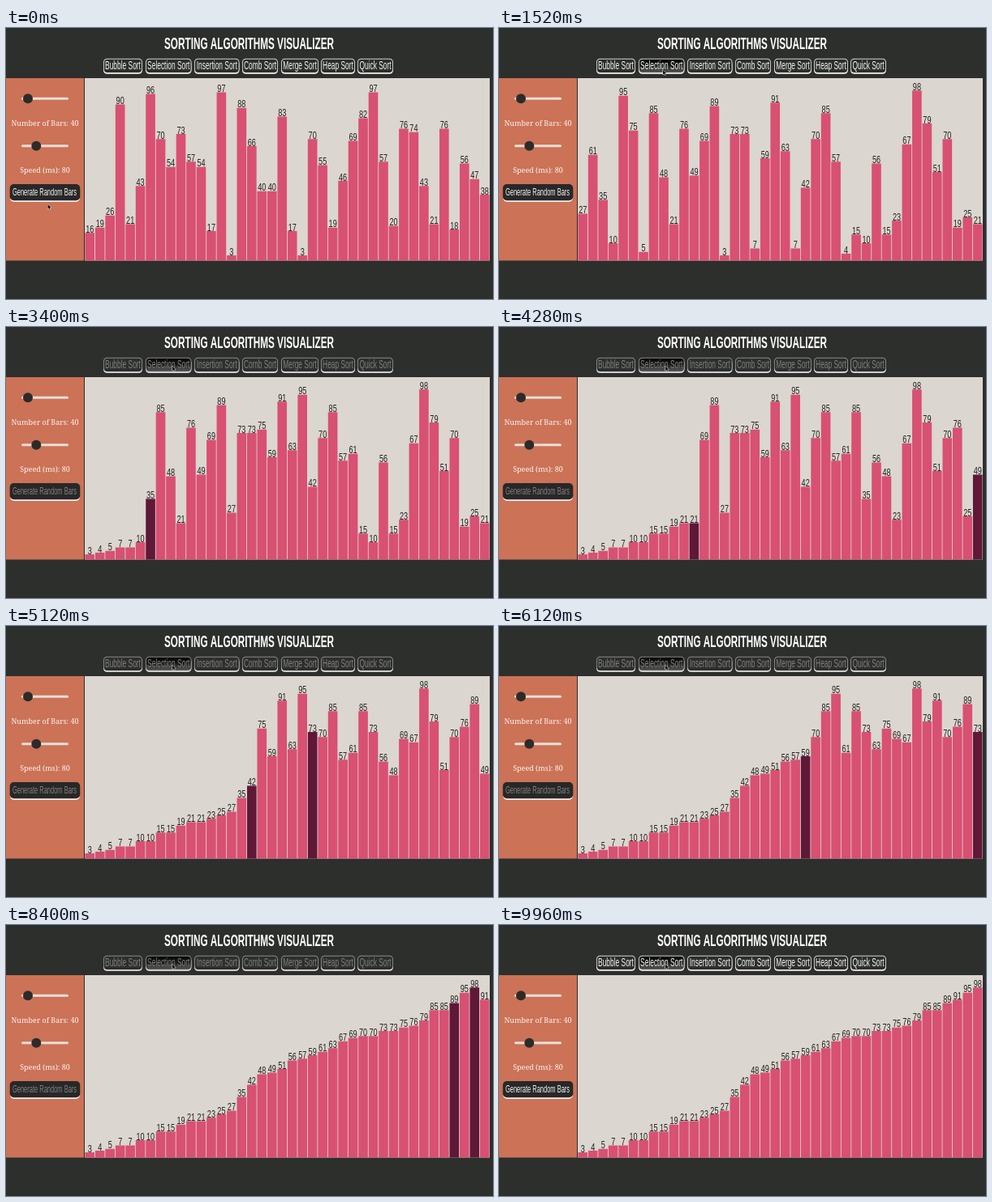
Recreate the animation shown at these times as an HTML page with a canvas. Size 600 by 335 pixels, loop 10 s.

```html
<!DOCTYPE html>
<html lang="en">
<head>
<meta charset="utf-8">
<title>Sorting Algorithms Visualizer</title>
<style>
  html, body { margin: 0; width: 100%; height: 100%; overflow: hidden; background: #2d2f2c; }
  canvas { display: block; }
</style>
</head>
<body>
<canvas id="stage" width="600" height="335"></canvas>
<script>
const ctx = document.getElementById('stage').getContext('2d');

const LOOP = 10000, REGENERATE = 500, SORT_START = 2360, STEP = 82.5;
const BG = '#2d2f2c', PINK = '#d85072', DARK = '#5f1836', INK = '#282828';
const SANS = '"Liberation Sans", Arial, sans-serif';
const SERIF = '"Noto Serif", serif';
const CONDENSED = 0.56, DIGITS = 0.76;   // display face and numeral proportions

const oldBars = [16, 19, 26, 90, 21, 43, 96, 70, 54, 73, 57, 54, 17, 97, 3, 88, 66, 40, 40, 83,
  17, 3, 70, 55, 19, 46, 69, 82, 97, 57, 20, 76, 74, 43, 21, 76, 18, 56, 47, 38];
const newBars = [27, 61, 35, 10, 95, 75, 5, 85, 48, 21, 76, 49, 69, 89, 3, 73, 73, 7, 59, 91,
  63, 7, 42, 70, 85, 57, 4, 15, 10, 56, 15, 23, 67, 98, 79, 51, 70, 19, 25, 21];

const buttons = [['Bubble', 120, 48], ['Selection', 172, 56.5], ['Insertion', 232, 55.5],
  ['Comb', 291, 44], ['Merge', 339, 46], ['Heap', 388, 42], ['Quick', 433, 44]];

// time, x, y of the pointer tip
const pointerPath = [[0, 51.5, 218], [100, 51.5, 218], [350, 52, 205], [850, 52, 205],
  [1480, 202, 52], [1700, 202, 52], [2100, 205, 48.5], [LOOP, 205, 48.5]];

// Selection sort: one step marks the slot, the next swaps in the minimum.
function selectionSteps(bars) {
  const a = [...bars], steps = [];
  for (let i = 0; i < a.length - 1; i++) {
    let min = i;
    for (let j = i + 1; j < a.length; j++) if (a[j] < a[min]) min = j;
    steps.push({ bars: [...a], marked: [i] });
    [a[i], a[min]] = [a[min], a[i]];
    steps.push({ bars: [...a], marked: [i, min] });
  }
  steps.push({ bars: a, marked: [] });
  return steps;
}
const steps = selectionSteps(newBars);
const SORT_END = SORT_START + (steps.length - 1) * STEP;

function rect(x, y, w, h, fill, radius = 0) {
  ctx.fillStyle = fill;
  ctx.beginPath();
  ctx.roundRect(x, y, w, h, radius);
  ctx.fill();
}

function text(str, x, y, font, fill, widthRatio = 1) {
  ctx.save();
  ctx.translate(x, y);
  ctx.scale(widthRatio, 1);
  ctx.font = font;
  ctx.textAlign = 'center';
  ctx.fillStyle = fill;
  ctx.fillText(str, 0, 0);
  ctx.restore();
}

function buttonFill(y, h, hover, plain) {
  if (!hover) return plain;
  const g = ctx.createLinearGradient(0, y, 0, y + h);
  g.addColorStop(0, '#050505');
  g.addColorStop(0.45, '#141414');
  g.addColorStop(1, '#5a5a58');
  return g;
}

function drawHeader(disabled, pointer) {
  rect(0, 0, 600, 1, '#22323d');
  text('SORTING ALGORITHMS VISUALIZER', 299.5, 25.5, 'bold 21px ' + SANS, '#fff', CONDENSED);
  for (const [name, x, w] of buttons) {
    const hover = pointer.x > x && pointer.x < x + w && pointer.y > 38 && pointer.y < 56.5;
    rect(x, 40, w, 16.7, '#f2f2f0', 4.5);
    rect(x, 37.8, w, 17.4, disabled ? '#8c8c8a' : '#d4d4d2', 4.5);
    rect(x + 0.9, 38.7, w - 1.8, 16.3, buttonFill(38, 17, hover, BG), 4);
    text(name + ' Sort', x + w / 2, 50.5, '15px ' + SANS, disabled ? '#80807e' : '#f4f4f2', CONDENSED);
  }
}

function drawSlider(y, knob) {
  rect(19, y - 1.5, 58, 3, '#eaded8', 1.5);
  rect(knob - 6, y - 6, 12, 12, '#2c2b29', 6);
}

function drawSidebar(disabled, pointer) {
  rect(0, 62, 96, 225.5, '#cb7257');
  drawSlider(87.3, 27);
  text('Number of Bars: 40', 48, 121, '9px ' + SERIF, '#fbf3ef');
  drawSlider(145.7, 37.3);
  text('Speed (ms): 80', 48, 179.3, '9px ' + SERIF, '#fbf3ef');
  const hover = pointer.y > 193 && pointer.y < 214 && pointer.x < 91;
  rect(5, 196, 86, 19, '#f6f1ee', 5);
  rect(4.7, 193, 86.6, 20.3, buttonFill(193, 20, hover, INK), 5);
  text('Generate Random Bars', 47.5, 206.8, '13.4px ' + SANS, disabled ? '#80807e' : '#f4f4f2', CONDENSED);
}

function drawChart({ bars, marked }) {
  const left = 97, bottom = 287.5, pitch = 499 / bars.length;
  rect(left, 62, 499, 225.5, '#dbd6cf');
  bars.forEach((value, i) => {
    const x = left + i * pitch, h = value * 2.145;
    rect(x + 0.4, bottom - h, pitch - 0.85, h, marked.includes(i) ? DARK : PINK);
    text(value, x + pitch / 2, bottom - h - 0.3, '12px ' + SANS, '#222', DIGITS);
  });
}

function pointerAt(t) {
  const k = pointerPath.findIndex(p => p[0] > t);
  const [t0, x0, y0] = pointerPath[k - 1], [t1, x1, y1] = pointerPath[k];
  const u = (t - t0) / (t1 - t0), e = u * u * (3 - 2 * u);
  return { x: x0 + (x1 - x0) * e, y: y0 + (y1 - y0) * e };
}

function drawPointer({ x, y }) {
  ctx.save();
  ctx.translate(x, y);
  ctx.beginPath();
  for (const [px, py] of [[0, 0], [0, 5.6], [1.3, 4.5], [2.2, 6.5], [3.1, 6.1], [2.3, 4.2], [4, 4.1]])
    ctx.lineTo(px, py);
  ctx.closePath();
  ctx.strokeStyle = '#eee';
  ctx.lineWidth = 1;
  ctx.stroke();
  ctx.fillStyle = '#111';
  ctx.fill();
  ctx.restore();
}

function stateAt(t) {
  if (t < REGENERATE) return { bars: oldBars, marked: [] };
  if (t < SORT_START) return { bars: newBars, marked: [] };
  return steps[Math.min(Math.floor((t - SORT_START) / STEP), steps.length - 1)];
}

function draw(now) {
  const t = now % LOOP, pointer = pointerAt(t);
  const sorting = t >= SORT_START && t < SORT_END;
  rect(0, 0, 600, 335, BG);
  drawHeader(sorting, pointer);
  drawSidebar(sorting, pointer);
  drawChart(stateAt(t));
  drawPointer(pointer);
  requestAnimationFrame(draw);
}
requestAnimationFrame(draw);
</script>
</body>
</html>
```
